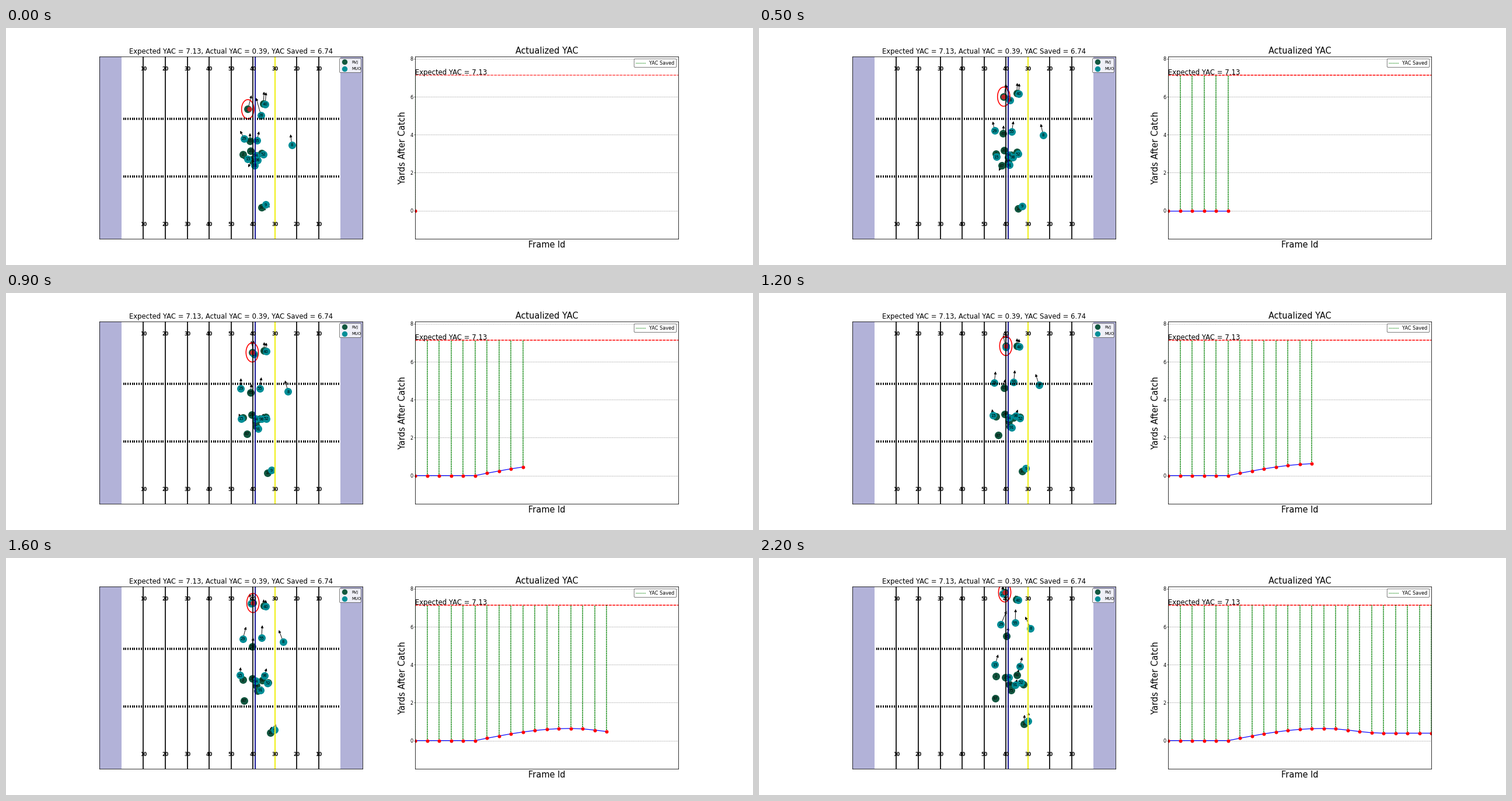
A matplotlib script that plays this animation: 1280x407 px, repeating every 2300 ms.

```python
import numpy as np
import matplotlib.pyplot as plt
from matplotlib.animation import FuncAnimation
from matplotlib.patches import Ellipse, FancyArrowPatch, FancyBboxPatch, Rectangle

W, H, DPI = 1280, 407, 64
PT = 72 / DPI                      # points per pixel
FRAMES, STEP_MS = 23, 100
LAST = FRAMES - 1
GREEN, TEAL = "#125740", "#008e97"
EXPECTED, ACTUAL, PEAK = 7.13, 0.39, 0.64
LEAD = 5.3                         # arrow length in frames of travel
BIG, MID, SMALL, TINY = 14.5, 11.6, 8.1, 6.9

plt.rcParams["font.family"] = "DejaVu Sans"

# ---- motion rules ----
TEAL_TEAM = "40 28 29 55 8 52 94 98 91 15 9".split()
players = []


def unit(travel, bow=(0, 0), **starts):
    """Players that run the same curve: travel plus a sideways bow."""
    for name, start in starts.items():
        players.append((name[1:], *map(np.array, (start, travel, bow))))


unit((6.7, -80.5), (5, -4.7), n10=(414.3, 139.5))
unit((0, -58.5), (1.3, -6.8), n84=(441, 130), n40=(444.3, 131))
unit((-19, -88.5), (-4, -9), n28=(437, 150))
unit((6.5, -59.5), (-1.5, 1), n65=(418, 194))
unit((6.5, -76), (-8.5, 5), n29=(408, 190))
unit((9, -82), (1.5, 4), n55=(430, 193.5))
unit((-24.5, -80), (3.5, 1), n8=(490, 201))
unit((-10, -41.5), (-8, 8), n15=(414.5, 225))
unit((16, -41), (0, 6), n98=(431, 227))
unit((12.7, -18.3), (0, 5), n60=(429.5, 219), n91=(426.5, 236))
unit((0, -14), (0, 3), n2=(406, 217), n94=(428, 219))
unit((-16, 15), (-2, 10), n87=(421, 226))
unit((8, -3.3), (2, 0), n75=(424, 230.5), n52=(441, 217))
unit((3, -6), n20=(419.5, 211), n68=(426.5, 223))
unit((15, 2), (0, -3), n71=(438.5, 215))
unit((16.5, -23), (3.7, 10.5), n16=(438, 308), n9=(444.8, 303.5))

names = [p[0] for p in players]
start, travel, bow = (np.array([p[k] for p in players]) for k in (1, 2, 3))
is_teal = np.array([n in TEAL_TEAM for n in names])


def motion(i):
    """Positions and speeds per frame of all players."""
    u = i / LAST
    pos = start + travel * u + 4 * bow * u * (1 - u)
    return pos, (travel + 4 * bow * (1 - 2 * u)) / LAST


def gained(i):
    """Yards after the catch: quick rise to a peak, then a slide back."""
    rise = np.sin(np.clip((i - 5) / 8, 0, 1) * np.pi / 2)
    slide = (1 - np.cos(np.clip((i - 13) / 5, 0, 1) * np.pi)) / 2
    return PEAK * rise - (PEAK - ACTUAL) * slide


# ---- helpers ----
fig = plt.figure(figsize=(W / DPI, H / DPI), dpi=DPI, facecolor="white")


def panel(left, top, right, bottom, **kw):
    ax = fig.add_axes([left / W, 1 - bottom / H,
                       (right - left) / W, (bottom - top) / H], **kw)
    for spine in ax.spines.values():
        spine.set_linewidth(0.8 * PT)
    return ax


def area(diameter):
    return (diameter * PT) ** 2


# ---- football field, in stage pixels ----
L, T, R, B = 160.4, 49, 611, 362.2
YARD = (R - L) / 120
field = panel(L, T, R, B)
field.set(xlim=(L, R), ylim=(B, T), xticks=[], yticks=[])


def yard_line(x, color, width):
    field.plot([x, x], [T, B], color=color, lw=width * PT)


for x in (L, L + 110 * YARD):
    field.add_patch(Rectangle((x, T), 10 * YARD, B - T, fc="navy",
                              alpha=0.3, lw=0, zorder=0))
for n in range(1, 10):
    x = L + (10 + 10 * n) * YARD
    yard_line(x, "black", 1.7)
    for y in (69.5, 336.5):
        field.text(x, y, str(10 * min(n, 10 - n)), size=SMALL * PT,
                   weight="bold", ha="center", va="center_baseline")
marks = L + np.arange(11, 110) * YARD
for y in (156.3, 255):
    field.vlines(marks, y - 2, y + 2, color="black", lw=1.8 * PT, zorder=2)
yard_line(427.4, "darkblue", 1.8)
yard_line(461, "#f0f020", 2.2)

arrows = [field.add_patch(FancyArrowPatch(
    (0, 0), (1, 1), arrowstyle="-|>", mutation_scale=9 * PT, shrinkA=0,
    shrinkB=0, color="black", lw=0.9 * PT)) for _ in names]
teams = [(~is_teal, field.scatter([], [], s=area(13), c=GREEN, lw=0, zorder=1.1)),
         (is_teal, field.scatter([], [], s=area(13), c=TEAL, lw=0, zorder=1.3))]
labels = [field.text(0, 0, n, size=TINY * PT, ha="center",
                     va="center_baseline", zorder=1.4 if teal else 1.2)
          for n, teal in zip(names, is_teal)]
ball = field.scatter([], [], s=area(8.6), c="#bc2a2a", lw=0, zorder=1.5)
ring = field.add_patch(Ellipse((0, 0), 21.2, 33, fill=False, ec="red",
                               lw=1.6 * PT, zorder=1.6))

# ---- yards after catch chart ----
chart = panel(701.4, 48.7, 1152.2, 362.4)
chart.set(xlim=(0, LAST), ylim=(-1.5, 8.13), xticks=[], yticks=range(0, 9, 2))
chart.tick_params(axis="y", labelsize=SMALL * PT, length=2 * PT,
                  width=0.6 * PT, pad=2 * PT)
chart.set_axisbelow(True)
chart.grid(axis="y", color="gray", ls="--", lw=0.5 * PT)
limit = chart.axhline(EXPECTED, color="red", ls=(0, (3.2, 0.9)), lw=1.5 * PT)
saved = chart.vlines([0], 0, EXPECTED, color="green", lw=1.8 * PT,
                     ls=(0, (1, 0.68)))
curve, = chart.plot([], [], color="blue", lw=1.2 * PT)
points, = chart.plot([], [], "o", color="red", ms=6 * PT, mew=0)

# ---- titles and legends ----
over = panel(0, 0, W, H, zorder=5)
over.set(xlim=(0, W), ylim=(H, 0))
over.axis("off")


def write(x, y, text, size, ha="center", **kw):
    over.text(x, y, text, size=size * PT, ha=ha, va="baseline", **kw)


def legend_box(x0, y0, x1, y1):
    over.add_patch(FancyBboxPatch(
        (x0 + 1.5, y0 + 1.5), x1 - x0 - 3, y1 - y0 - 3,
        boxstyle="round,pad=1.5,rounding_size=1.5", fc=(1, 1, 1, 0.8),
        ec="#444444", lw=0.7 * PT))


write(385.6, 44.4, f"Expected YAC = {EXPECTED}, Actual YAC = {ACTUAL}, "
      f"YAC Saved = {EXPECTED - ACTUAL:.2f}", MID)
write(926.5, 44, "Actualized YAC", BIG)
write(926.5, 376.6, "Frame Id", BIG)
write(684, 205.7, "Yards After Catch", BIG, rotation=90,
      rotation_mode="anchor")
write(701, 79.6, f"Expected YAC = {EXPECTED}", MID, ha="left")

legend_box(571.6, 52.2, 608.3, 76.6)
for y, color, team in ((58.4, GREEN, "RVJ"), (69.5, TEAL, "MUO")):
    over.scatter([580.2], [y], s=area(9.4), c=color, lw=0)
    write(592, y + 2.5, team, TINY, ha="left")

legend_box(1076.2, 53, 1148.8, 67.4)
over.plot([1079, 1096], [60, 60], color="green", lw=1.2 * PT,
          ls=(0, (1, 1.1)))
write(1102, 62.8, "YAC Saved", SMALL, ha="left")


def draw(i):
    pos, vel = motion(i)
    for mask, dots in teams:
        dots.set_offsets(pos[mask])
    for p, v, arrow, label in zip(pos, vel, arrows, labels):
        arrow.set_positions(p, p + LEAD * v)
        label.set_position(p)
    ring.set_center(pos[0])
    ball.set_offsets([pos[0] + (3 * 0.5 ** i, 0)])

    x = np.arange(i + 1)
    y = gained(x)
    saved.set_segments([[(a, b), (a, EXPECTED)] for a, b in zip(x, y)])
    curve.set_data(x, y)
    points.set_data(x, y)
    limit.set_alpha(1 - 0.3 ** (i + 1))


anim = FuncAnimation(fig, draw, frames=FRAMES, interval=STEP_MS, repeat=True,
                     repeat_delay=0, init_func=lambda: draw(0))
plt.show()
```
